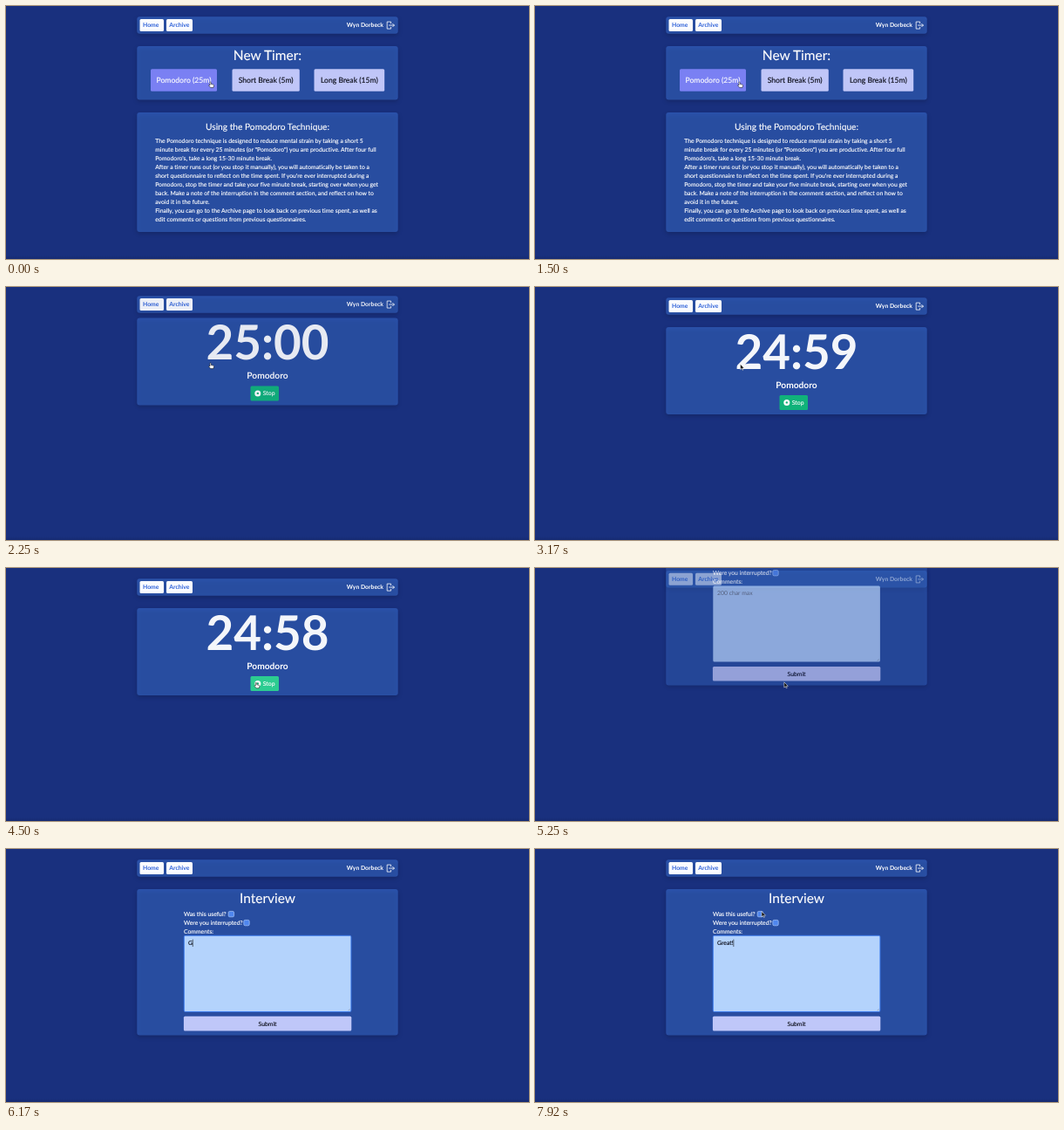
An HTML page that plays this animation: 600x290 px, repeating every 8 s.

```html
<!DOCTYPE html>
<html lang="en">
<head>
<meta charset="utf-8">
<title>Pomodoro timer</title>
<style>
  html, body { margin: 0; height: 100%; overflow: hidden; background: #19307e; }
  svg { display: block; width: 100%; height: 100%; }
  text {
    font-family: Lato, "Open Sans", sans-serif; font-size: 6.84px; font-variant-ligatures: none;
    fill: #fff; stroke: #fff; stroke-width: .14; text-rendering: geometricPrecision; white-space: pre;
  }
  .panel { fill: rgba(72, 135, 245, .4); filter: drop-shadow(0 2px 2.5px rgba(0, 0, 0, .45)); }
  .bold { font-weight: 700; stroke: none; }
  .title { font-size: 15.5px; }
  .subtitle { font-size: 10.2px; }
  .choice { font-size: 8.6px; }
  .clock { font-size: 54.8px; font-weight: 700; fill: #f4f6fa; stroke: none; }
  .link { font-size: 6.8px; font-weight: 700; fill: #2f62d8; stroke: none; }
  .dark { fill: #0b0d18; stroke: #0b0d18; }
  .hint { fill: #6b7280; stroke: none; }
  .line { fill: none; stroke: #fff; stroke-width: .8; stroke-linecap: round; stroke-linejoin: round; }
</style>
</head>
<body>
<svg id="stage" viewBox="0 0 600 290"></svg>
<script>
const LOOP = 8000;
const TIMER_AT = 1750, STOPPED_AT = 4830, INTERVIEW_AT = 5000;
const ENTER_MS = 815;
const HEADER_H = 19.5, TIMER_H = 100, INTERVIEW_H = 167.5;

const rect = (x, y, w, h, fill, extra = '') =>
  `<rect x="${x}" y="${y}" width="${w}" height="${h}" rx="1.5" fill="${fill}" ${extra}/>`;
const panel = (y, h) => `<rect class="panel" x="150.3" y="${y}" width="299.4" height="${h}" rx="3"/>`;
const text = (x, y, str, cls = '', anchor = 'start', id = '') =>
  `<text x="${x}" y="${y}" class="${cls}" text-anchor="${anchor}" id="${id}">${str}</text>`;
const centered = (y, str, cls, id) => text(300, y, str, cls, 'middle', id);
const choice = (x, w, label, fill, cls) =>
  rect(x, 72.2, w, 25.6, fill) + text(x + w / 2, 88, label, 'choice ' + cls, 'middle');
const checkbox = (x, y) =>
  rect(x, y, 6.4, 6.4, '#4f86ee', 'stroke="#a9c8fb" stroke-width=".7"');

const guide = [
  'The Pomodoro technique is designed to reduce mental strain by taking a short 5',
  'minute break for every 25 minutes (or "Pomodoro") you are productive. After four full',
  "Pomodoro's, take a long 15-30 minute break.",
  'After a timer runs out (or you stop it manually), you will automatically be taken to a',
  "short questionnaire to reflect on the time spent. If you're ever interrupted during a",
  'Pomodoro, stop the timer and take your five minute break, starting over when you get',
  'back. Make a note of the interruption in the comment section, and reflect on how to',
  'avoid it in the future.',
  'Finally, you can go to the Archive page to look back on previous time spent, as well as',
  'edit comments or questions from previous questionnaires.'
];

const header = panel(12.2, HEADER_H) +
  rect(153.5, 15, 27.5, 14, '#fafbff') + text(157, 24.4, 'Home', 'link') +
  rect(184, 15, 30, 14, '#fafbff') + text(187.3, 24.4, 'Archive', 'link') +
  text(433, 24.3, 'Wyn Dorbeck', 'bold', 'end') +
  '<path class="line" d="M441.6 19.9V18.1H437.2V26.1H441.6V24.3M439.6 22.1H445.4M443.7 20.4L445.4 22.1 443.7 23.8"/>';

const home = panel(46, 61.5) + centered(62.3, 'New Timer:', 'title') +
  choice(166, 76, 'Pomodoro (25m)', '#7a80f3', '') +
  choice(259.5, 77.3, 'Short Break (5m)', '#c0c6f8', 'dark') +
  choice(353.5, 80.7, 'Long Break (15m)', '#c0c6f8', 'dark') +
  panel(122, 137) + centered(141.8, 'Using the Pomodoro Technique:', 'subtitle') +
  guide.map((line, i) => text(171.2, 156.5 + 10 * i, line)).join('');

const timer = panel(46, TIMER_H) + centered(94, '', 'clock', 'clock') +
  centered(115.8, 'Pomodoro', 'subtitle bold') +
  rect(280.5, 124, 32.5, 17, '', 'id="stop"') +
  '<circle cx="288.8" cy="132.4" r="3.5" fill="#fff"/>' + rect(287.6, 131.2, 2.4, 2.4, '#18ae78') +
  text(294.8, 134.9, 'Stop');

const interview = panel(46, INTERVIEW_H) + centered(62.3, 'Interview', 'title') +
  text(204, 76.5, 'Was this useful?') + checkbox(255.2, 71.4) +
  text(204, 86.5, 'Were you interrupted?') + checkbox(272.8, 81.4) +
  text(204, 96.5, 'Comments:') +
  rect(204.3, 99.3, 191.6, 87.2, '#b4d3fc', 'id="area" stroke-width=".9"') +
  '<path d="M392.6 185.3l2-2M394 185.3l.7-.7" stroke="#667" stroke-width=".35"/>' +
  text(209, 110, '', '', 'start', 'comment') +
  '<path id="caret" d="M0 103.6V112" stroke="#111" stroke-width=".6"/>' +
  rect(203.9, 191.8, 192.4, 16.7, '#bfc7f9') + centered(202.6, 'Submit', 'dark');

const pointers =
  '<path id="hand" fill="#fff" stroke="#111" stroke-width=".55" d="M1.5 .8Q2.3 0 2.8 1L3 3 5.5 3.5Q6.4 3.9 6.1 5L5.4 7H2.4L.2 4.5Q.1 3.4 1.7 4.1Z"/>' +
  '<path id="arrow" fill="#111" stroke="#fff" stroke-width=".5" d="M0 0V6.2L1.5 4.9 2.5 7 3.4 6.6 2.5 4.6H4.5Z"/>' +
  '<path id="beam" fill="none" stroke="#111" stroke-width=".5" d="M0 0Q1 0 1 1V6Q1 7 0 7M2 0Q1 0 1 1M1 6Q1 7 2 7"/>';

const pages = { header, home, timer, interview };
document.getElementById('stage').innerHTML =
  '<defs><linearGradient id="floor" x2="0" y2="1"><stop stop-color="#14276a" stop-opacity="0"/><stop offset="1" stop-color="#14276a"/></linearGradient></defs>' +
  rect(0, 286, 600, 6, 'url(#floor)') +
  Object.entries(pages).map(([id, body]) => `<g id="${id}">${body}</g>`).join('') +
  `<g id="pointer">${pointers}</g>`;

const $ = id => document.getElementById(id);
const clamp = v => Math.min(1, Math.max(0, v));
const mix = (a, b, k) => a + (b - a) * k;
const smooth = v => { const k = clamp(v); return k * k * (3 - 2 * k); };
const show = (id, on) => { $(id).style.display = on ? '' : 'none'; };

// CSS "ease": cubic-bezier(.25, .1, .25, 1)
function ease(x) {
  const bezier = (a, b, s) => 3 * a * s * (1 - s) ** 2 + 3 * b * s * s * (1 - s) + s ** 3;
  let lo = 0, hi = 1;
  for (let i = 0; i < 24; i++) {
    const mid = (lo + hi) / 2;
    if (bezier(.25, .25, mid) < x) lo = mid; else hi = mid;
  }
  return bezier(.1, 1, lo);
}

// Drops in by its own height while fading up.
function enter(id, height, progress) {
  $(id).setAttribute('transform', `translate(0 ${-height * (1 - progress)})`);
  $(id).setAttribute('opacity', progress > .001 ? mix(.45, 1, progress) : 0);
}

function placePointer(t) {
  const toStop = smooth((t - 3080) / 750), toCheckbox = smooth((t - 7250) / 640);
  const x = mix(mix(232.4, 284.8, toStop), 260, toCheckbox);
  const y = mix(mix(86.6, 130.8, toStop), 71.6, toCheckbox);
  const kind = t < 3080 ? 'hand' : t < 3600 ? 'arrow' : t < INTERVIEW_AT ? 'hand'
    : t < 5700 ? 'arrow' : t < 6170 ? 'beam' : t < 7250 ? '' : y > 98 ? 'beam' : 'arrow';
  ['hand', 'arrow', 'beam'].forEach(k => show(k, k === kind));
  $('pointer').setAttribute('transform', `translate(${x + (kind === 'arrow' && t < 6000 ? 1 : 0)} ${y})`);
}

function render(t) {
  const onHome = t < TIMER_AT, onTimer = !onHome && t < STOPPED_AT;
  const progress = onHome ? 1 : ease(clamp((t - (onTimer ? TIMER_AT : INTERVIEW_AT)) / ENTER_MS));
  show('home', onHome);
  show('timer', onTimer);
  show('interview', t >= INTERVIEW_AT);
  enter('header', HEADER_H, progress);
  enter('timer', TIMER_H, progress);
  enter('interview', INTERVIEW_H, progress);

  $('clock').textContent = t < 3080 ? '25:00' : t < 4080 ? '24:59' : '24:58';
  const hover = clamp((t - 3650) / 150);
  $('stop').setAttribute('fill', `rgb(${mix(16, 44, hover)},${mix(178, 204, hover)},${mix(122, 145, hover)})`);

  const typed = 'Great!'.slice(0, [6170, 6330, 6420, 6580, 6670, 6920].filter(at => t >= at).length);
  const focused = t >= 5830;
  $('comment').textContent = typed || '200 char max';
  $('comment').setAttribute('class', typed ? 'dark' : 'hint');
  $('area').setAttribute('stroke', focused ? '#3b7cf0' : 'none');
  show('caret', focused);
  const caretX = 209.3 + (typed ? $('comment').getComputedTextLength() : 0);
  $('caret').setAttribute('transform', `translate(${caretX} 0)`);
  placePointer(t);
}

function tick() {
  render(performance.now() % LOOP);
  requestAnimationFrame(tick);
}
tick();
</script>
</body>
</html>
```
